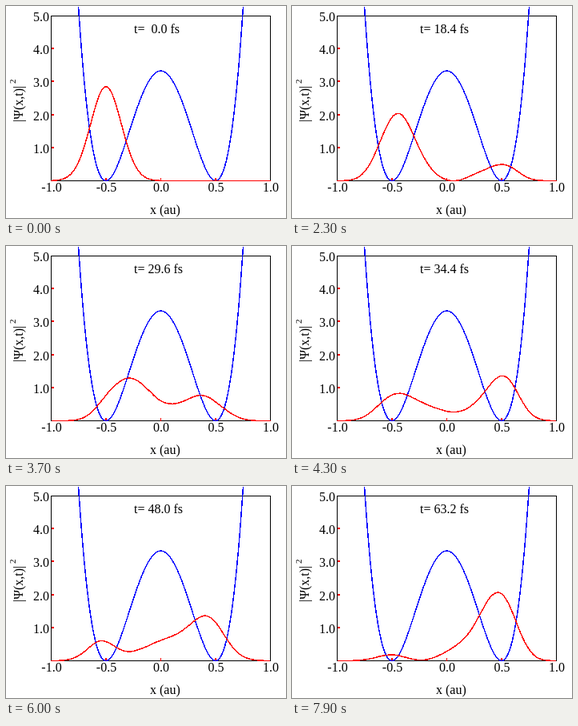
These frames come from a looping animation (350x265 px, 8000 ms). An HTML page:

```html
<!DOCTYPE html>
<html lang="en">
<head>
<meta charset="utf-8">
<title>Wave packet in a double well</title>
<style>
  html, body { margin: 0; width: 100%; height: 100%; overflow: hidden; background: #fff; }
  svg { display: block; width: 350px; height: 265px; }
  path { fill: none; stroke-width: 1.5; stroke-linejoin: round; shape-rendering: crispEdges; }
  text { font: 16px "Liberation Serif", "Times New Roman", serif; white-space: pre; }
</style>
</head>
<body>
<svg id="stage" viewBox="0 0 350 265"></svg>
<script>
const stage = document.getElementById('stage');

const STEP_MS = 100, STEPS = 80, STEP_FS = 0.8;
const LEFT = 56.5, RIGHT = 330.5, TOP = 12.5, BOTTOM = 218.5;
const px = x => 193.5 + 137 * x;
const py = y => BOTTOM - 41.2 * y;

// Double well with minima at +-0.5, height 1 at the centre
const well = x => 16 * (x * x - 0.25) ** 2;

// Atomic units: particle mass, barrier height, width of the starting packet
const MASS = 1822.9, BARRIER = 0.008, PACKET = 25.6;
const DX = 0.01, HALF = 110, N = 2 * HALF + 1;
const SUBSTEPS = 240, DT = STEP_FS * 41.341 / SUBSTEPS;
const xAt = j => (j - HALF) * DX;

// Leapfrog solution of the Schroedinger equation, one density per step
function evolve() {
  const re = new Float64Array(N), im = new Float64Array(N), diag = new Float64Array(N);
  const hop = DT / (2 * MASS * DX * DX);
  for (let j = 1; j < N - 1; j++) {
    const x = xAt(j);
    re[j] = (PACKET / Math.PI) ** 0.25 * Math.exp(-PACKET * (x + 0.5) ** 2 / 2);
    diag[j] = 2 * hop + DT * BARRIER * well(x);
  }
  const kick = (to, from, sign) => {
    for (let j = 1; j < N - 1; j++) {
      to[j] += sign * (diag[j] * from[j] - hop * (from[j - 1] + from[j + 1]));
    }
  };
  const out = [];
  for (let s = 0; s < STEPS; s++) {
    out.push(re.map((r, j) => r * r + im[j] * im[j]));
    for (let k = 0; k < SUBSTEPS; k++) {
      kick(im, re, -1);
      kick(re, im, 1);
    }
  }
  return out;
}

function add(tag, attrs, text = '') {
  const el = document.createElementNS('http://www.w3.org/2000/svg', tag);
  for (const key in attrs) el.setAttribute(key, attrs[key]);
  el.textContent = text;
  stage.append(el);
  return el;
}

const label = (text, x, y, anchor = 'start') =>
  add('text', { x, y, 'text-anchor': anchor }, text);

const rotated = (text, x, y, size) =>
  add('text', { transform: `translate(${x} ${y}) rotate(-90)`, style: `font-size: ${size}px` }, text);

// Path data through f(i) = [x, y] for whole i
function curve(from, to, f) {
  let d = '';
  for (let i = from; i <= to; i++) {
    const [x, y] = f(i);
    d += `${d ? 'L' : 'M'}${px(x).toFixed(2)} ${py(y).toFixed(2)}`;
  }
  return d;
}

function axes() {
  const frame = `M${LEFT} ${TOP}H${RIGHT}V${BOTTOM}H${LEFT}Z`;
  add('path', { d: frame, stroke: '#000', style: 'stroke-width: 1' });

  let ticks = '';
  for (let v = 1; v <= 5; v++) {
    const y = Math.round(py(v) - 0.5);
    if (v < 5) ticks += `M${LEFT} ${y}h3.5`;
    label(v.toFixed(1), 54, y + 7, 'end');
  }
  for (let i = -2; i <= 2; i++) {
    const x = px(i / 2);
    if (Math.abs(i) < 2) ticks += `M${x} ${BOTTOM}v-3.5`;
    label((i / 2).toFixed(1), x + 0.5, 232, 'middle');
  }
  add('path', { d: ticks, stroke: '#f00' });

  label('x (au)', 180, 260);
  rotated('|Ψ(x,t)|', 21, 145, 16);
  rotated('2', 12, 97, 11);
}

axes();
const edge = 0.7515;
add('path', { stroke: '#00f', d: curve(-100, 100, i => [edge * i / 100, 10 / 3 * well(edge * i / 100)]) });
const packet = add('path', { stroke: '#f00' });
const clock = label('', 160, 34);
const densities = evolve();

function draw(step) {
  packet.setAttribute('d', curve(HALF - 100, HALF + 100, j => [xAt(j), densities[step][j]]));
  clock.textContent = 't= ' + (step * STEP_FS).toFixed(1).padStart(4) + ' fs';
}

const start = performance.now();
let shown = -1;
function tick() {
  const step = Math.floor((performance.now() - start) / STEP_MS) % STEPS;
  if (step !== shown) draw(shown = step);
  requestAnimationFrame(tick);
}
tick();
</script>
</body>
</html>
```
